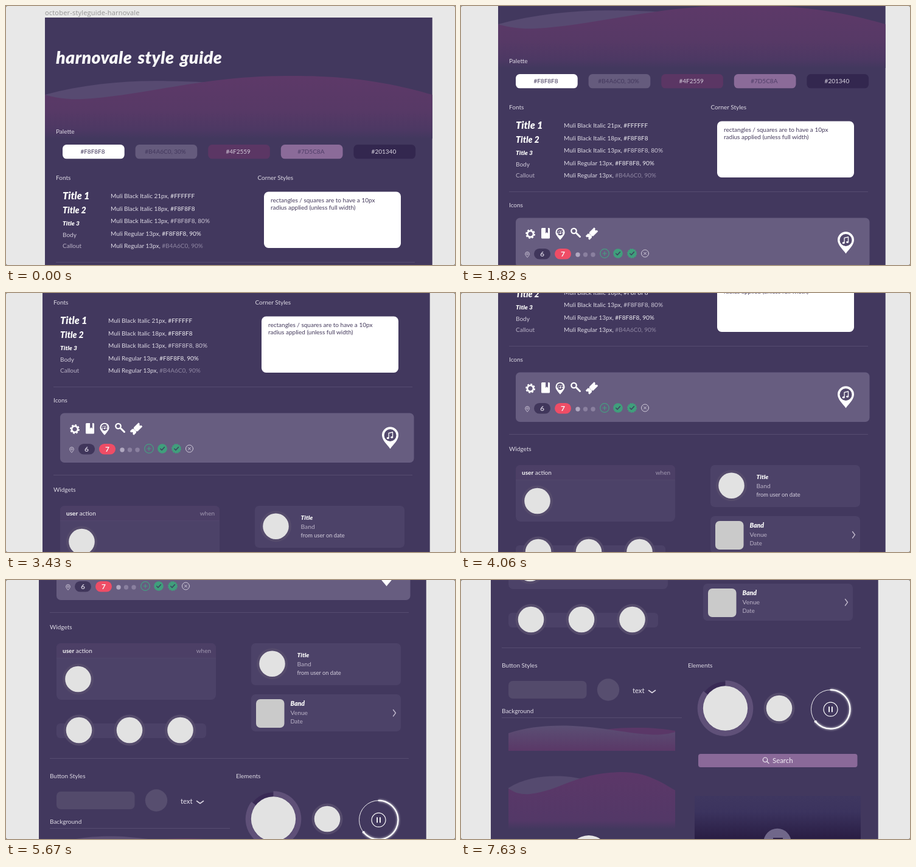
These frames come from a looping animation (738 px wide and 426 px high, 7700 ms). An HTML page:

```html
<!DOCTYPE html>
<html lang="en">
<head>
<meta charset="utf-8">
<title>Style guide</title>
<style>
  html, body { margin: 0; width: 100%; height: 100%; overflow: hidden; background: #777; }
  #stage { display: block; width: 738px; height: 426px; background: #e8e8e8; border-radius: 3px; }
  text { font: 10px Lato, "Open Sans", sans-serif; fill: #dedae5; }
  .label { font: 11px "Open Sans", sans-serif; letter-spacing: .2px; fill: #929292; }
  .black { font-weight: 900; font-style: italic; fill: #f8f8f8; }
  .headline { font-size: 28.5px; letter-spacing: .4px; word-spacing: 3px; }
  .bold { font-weight: 700; fill: #f8f8f8; }
  .bright { fill: #f0eef3; }
  .soft { fill: #b9b1c6; }
  .dim { fill: #9087a3; }
  .ink { fill: #443a5c; }
  .mid { text-anchor: middle; }
  .end { text-anchor: end; }
  .rule { stroke: #564c70; }
  .card { fill: #4c4268; }
  .line { fill: none; stroke-linecap: round; stroke-linejoin: round; }
  .white { fill: #fff; }
</style>
</head>
<body>
<svg id="stage" viewBox="0 0 738 426">
  <defs>
    <linearGradient id="fade" x1="0" y1="0" x2="0" y2="1">
      <stop offset="0" stop-color="#5d3968"/>
      <stop offset=".55" stop-color="#573966"/>
      <stop offset=".87" stop-color="#4c3863"/>
      <stop offset="1" stop-color="#42385e"/>
    </linearGradient>
    <linearGradient id="block" x1="0" y1="0" x2="0" y2="1">
      <stop offset="0" stop-color="#5c3768"/>
      <stop offset=".85" stop-color="#533867"/>
      <stop offset="1" stop-color="#42385e"/>
    </linearGradient>
    <linearGradient id="mist" x1="0" y1="0" x2="0" y2="1">
      <stop offset="0" stop-color="#5b4f74"/>
      <stop offset="1" stop-color="#5a3867"/>
    </linearGradient>
    <linearGradient id="night" x1="0" y1="0" x2="0" y2="1">
      <stop offset="0" stop-color="#3f3760"/>
      <stop offset=".35" stop-color="#3b335e"/>
      <stop offset="1" stop-color="#271a40"/>
    </linearGradient>
    <filter id="glow" x="-20%" y="-20%" width="140%" height="140%">
      <feGaussianBlur stdDeviation="1.6"/>
    </filter>
    <g id="avatar">
      <circle r="25.5" fill="#554b6c"/>
      <circle r="21.3" fill="#e2e2e2"/>
    </g>
    <path id="pin" d="M0 22C-5 15-13.500 8-13.500-.5a13.500 13.500 0 0 1 27 0C13.500 8 5 15 0 22z"/>
    <g id="note">
      <path class="line" d="M-2.400 4V-4.200L4-5.500V2.600" stroke="#fff" stroke-width="1.300"/>
      <ellipse cx="-3.800" cy="4.200" rx="2" ry="1.600" class="white"/>
      <ellipse cx="2.600" cy="2.800" rx="2" ry="1.600" class="white"/>
    </g>
    <path id="tick" class="line" d="M-3.200 .2L-1 2.400L3.400-2.400" stroke="#3d4a61" stroke-width="1.600"/>
  </defs>

  <g id="page">
    <text class="label" x="64" y="15">october-styleguide-harnovale</text>
    <rect x="64" y="19" width="636.700" height="1300" fill="#42385e"/>

    <!-- header -->
    <path d="M64 146C130 128 200 122 265 123.500C310 124 350 126 390 132L240 160H64z" fill="#574a71"/>
    <path d="M64 146C85 152 105 154 125 153C230 147 330 114 465 115C575 114 645 130 700.700 146V218H64z" fill="url(#fade)"/>
    <text class="black headline" x="82" y="94.500">harnovale style guide</text>

    <!-- palette -->
    <text x="82" y="210.300">Palette</text>
    <g id="swatches"></g>

    <!-- fonts -->
    <text x="82" y="286.300">Fonts</text>
    <text class="black" x="93" y="318" style="font-size:16.300px">Title 1</text>
    <text class="black" x="93" y="341.300" style="font-size:14.200px">Title 2</text>
    <text class="black" x="93" y="360.800" style="font-size:10.200px">Title 3</text>
    <text x="93" y="380.300" style="fill:#d0cad9">Body</text>
    <text class="soft" x="93" y="398">Callout</text>
    <text x="172" y="316.300">Muli Black Italic 21px, <tspan class="bright">#FFFFFF</tspan></text>
    <text x="172" y="336.800">Muli Black Italic 18px, <tspan class="bright">#F8F8F8</tspan></text>
    <text x="172" y="357.300">Muli Black Italic 13px, <tspan style="fill:#cfc9d8">#F8F8F8, 80%</tspan></text>
    <text x="172" y="377.800">Muli Regular 13px, <tspan class="bright">#F8F8F8, 90%</tspan></text>
    <text x="172" y="398.300">Muli Regular 13px, <tspan class="dim">#B4A6C0, 90%</tspan></text>

    <text x="413.500" y="286.300">Corner Styles</text>
    <rect class="white" x="424" y="305.500" width="225" height="92.500" rx="7.500"/>
    <text class="ink" x="435" y="323.300">rectangles / squares are to have a 10px</text>
    <text class="ink" x="435" y="334.800">radius applied (unless full width)</text>
    <path class="rule" d="M82 421.500H672"/>

    <!-- icons -->
    <text x="82" y="447">Icons</text>
    <rect x="93" y="464.500" width="581.500" height="81.500" rx="7" fill="#675d80"/>
    <g transform="translate(117 491)" fill="none" stroke="#fff">
      <circle r="5" stroke-width="2.600"/>
      <circle r="6.600" stroke-width="2.600" stroke-dasharray="2.900 2.284"/>
    </g>
    <path class="white" d="M136.500 481H142V490L144 488L146 490V481H147.500Q149 481 149 482.500V497Q149 498.500 147.500 498.500H136.500Q135 498.500 135 497V482.500Q135 481 136.500 481z"/>
    <use href="#pin" transform="translate(166 488.500) scale(.56)" fill="#fff"/>
    <circle cx="166" cy="488" r="5.400" fill="#5b5074"/>
    <use href="#note" transform="translate(164 488.500) scale(.52)"/>
    <use href="#note" transform="translate(168.500 488) scale(.52)"/>
    <g class="line" stroke="#fff">
      <circle cx="188.500" cy="486" r="4.200" stroke-width="2.300"/>
      <path d="M193 490L198.500 495.500" stroke-width="3"/>
    </g>
    <g transform="translate(218 490.500) rotate(-45) scale(.95 .82)">
      <path class="white" d="M-10.500-5.500H-4.500A1.500 1.500 0 0 0-1.500-5.500H10.500V-2A2 2 0 0 0 10.500 2V5.500H-1.500A1.500 1.500 0 0 0-4.500 5.500H-10.500V2A2 2 0 0 0-10.500-2z"/>
      <path d="M-3-3V3.500" stroke="#675d80" stroke-width=".8" stroke-dasharray="1.500 1.200"/>
    </g>
    <use href="#pin" transform="translate(112 524) scale(.25)" fill="none" stroke="#c9c2d4" stroke-width="4"/>
    <circle cx="112" cy="524" r="1.400" fill="none" stroke="#c9c2d4" stroke-width=".8"/>
    <rect x="123" y="515" width="27" height="17.500" rx="8.750" fill="#40365b"/>
    <text class="mid" x="136.500" y="527.700" style="font-size:12px;font-weight:700;fill:#cbc5d6">6</text>
    <rect x="157" y="515" width="27" height="17.500" rx="8.750" fill="#ef4d66"/>
    <text class="mid bold" x="170.500" y="527.700" style="font-size:12px">7</text>
    <circle cx="195" cy="525" r="3.700" fill="#b0a8c0"/>
    <circle cx="207.500" cy="525" r="3.700" fill="#8a809f"/>
    <circle cx="220" cy="525" r="3.700" fill="#8a809f"/>
    <g class="line" stroke="#45a081">
      <circle cx="239" cy="523" r="7.300" stroke-width="1.200"/>
      <path d="M236 523H242M239 520V526" stroke-width="1.200"/>
    </g>
    <circle cx="261" cy="523" r="7.800" fill="#409f7c"/>
    <use href="#tick" x="261" y="523"/>
    <circle cx="284" cy="523" r="7.200" fill="#409f7c"/>
    <circle cx="284" cy="523" r="7.200" fill="none" stroke="#409f7c" stroke-width="1.600" stroke-dasharray="2.270 1.500"/>
    <use href="#tick" x="284" y="523"/>
    <g class="line" stroke="#d3cddc">
      <circle cx="305.500" cy="523" r="6"/>
      <path d="M303.500 521L307.500 525M307.500 521L303.500 525"/>
    </g>
    <use href="#pin" x="635.500" y="501.300" fill="#fff"/>
    <circle cx="635.500" cy="501" r="10" fill="#544a6e"/>
    <use href="#note" x="635.500" y="501.500"/>
    <path class="rule" d="M82 566.500H672"/>

    <!-- widgets -->
    <text x="82" y="593.500">Widgets</text>
    <rect class="card" x="93" y="617" width="262" height="93" rx="8"/>
    <path d="M93 641.500V625Q93 617 101 617H347Q355 617 355 625V641.500z" fill="#4c3f66"/>
    <path d="M93 641.500H355" stroke="#51466c"/>
    <text class="bright" x="103" y="632.500"><tspan class="bold">user</tspan> action</text>
    <text class="end" x="347" y="632.500" style="fill:#a198b1">when</text>
    <use href="#avatar" x="128.500" y="676"/>

    <rect x="93" y="749" width="246" height="24" rx="6" fill="#4b4167"/>
    <use href="#avatar" x="130" y="760"/>
    <use href="#avatar" x="213" y="760"/>
    <use href="#avatar" x="296.500" y="760"/>

    <rect class="card" x="413" y="617" width="246" height="69" rx="7"/>
    <use href="#avatar" x="447.500" y="650.700"/>
    <text class="black" x="488.500" y="640" style="font-size:10.200px">Title</text>
    <text class="soft" x="488.500" y="654.700" style="font-size:10.300px">Band</text>
    <text x="488.500" y="668.500" style="font-size:9.300px;fill:#d4cedd">from user on date</text>

    <rect class="card" x="413" y="701" width="246" height="61" rx="7"/>
    <rect x="421" y="709" width="46.500" height="47" rx="7" fill="#cacaca"/>
    <text class="black" x="477.500" y="720" style="font-size:10.500px">Band</text>
    <text class="soft" x="477.500" y="734.700" style="font-size:10.300px">Venue</text>
    <text class="soft" x="477.500" y="748.500" style="font-size:9.500px">Date</text>
    <path class="line" d="M646.500 726.500L650.500 731.700L646.500 737" stroke="#c0b8cc" stroke-width="1.400"/>
    <path class="rule" d="M82 806.500H672"/>

    <!-- buttons -->
    <text x="82" y="839">Button Styles</text>
    <rect x="93" y="861" width="128.500" height="29" rx="7" fill="#534a6b"/>
    <circle cx="257" cy="875.500" r="18.200" fill="#574e6f"/>
    <text x="297" y="881" style="font-size:11.200px;font-weight:500">text</text>
    <path class="line" d="M323.500 876.500L329 880.500L334.500 876.500" stroke="#d6d0de" stroke-width="1.600"/>

    <!-- backgrounds -->
    <text x="82" y="913.500">Background</text>
    <path class="rule" d="M82 921.500H378"/>
    <path d="M230 945C255 939 280 938 305 938C330 938 350 940 367 943V976H230z" fill="#5a3767"/>
    <path d="M93 947C120 938 150 934 188 934.500C245 936 290 948 330 949.500C345 950 357 948 367 945V976H93z" fill="url(#mist)"/>
    <path d="M93 1037C120 1020 155 1016 185 1018C200 1019 215 1022 230 1026L170 1052H93z" fill="#554a6f"/>
    <path d="M93 1038C105 1046 115 1048 128 1047C180 1041 205 1011 280 1011C320 1011 345 1028 367 1041V1105H93z" fill="url(#block)"/>
    <circle cx="225" cy="1148" r="33" fill="#e6e6e6"/>

    <!-- elements -->
    <text x="388" y="839">Elements</text>
    <path d="M449.500 866A40 40 0 0 0 418 881.300" fill="none" stroke="#392a55" stroke-width="7"/>
    <path d="M449.500 864.800A41.300 41.300 0 1 1 417 880.600" fill="none" stroke="#5f5078" stroke-width="9"/>
    <circle cx="449.500" cy="906" r="36.700" fill="#e2e2e2"/>
    <use href="#avatar" x="538" y="906"/>
    <g transform="translate(622.500 907.700)" fill="none" stroke="#fff">
      <path d="M0-32A32 32 0 1 1-24.900 20.100" stroke-width="4" opacity=".55" filter="url(#glow)"/>
      <circle r="32" stroke-width="1" opacity=".9"/>
      <path d="M0-32A32 32 0 1 1-24.900 20.100" stroke-width="2.200" stroke-linecap="round"/>
      <circle cx="-24.900" cy="20.100" r="2" fill="#fff" stroke="none"/>
      <circle r="11.500" stroke-width="1.200"/>
      <path d="M-2.400-4.500V4.500M2.400-4.500V4.500" stroke-width="1.800"/>
    </g>
    <rect x="405" y="981" width="261.500" height="22" rx="4" fill="#8a6999"/>
    <g class="line" stroke="#efeaf3" stroke-width="1.200">
      <circle cx="515" cy="990.700" r="3.700"/>
      <path d="M517.800 993.500L521 996.700"/>
    </g>
    <text x="527" y="995.700" style="font-size:11.400px;fill:#efeaf3">Search</text>
    <rect x="399" y="1050" width="273" height="76" fill="url(#night)"/>
    <circle cx="535" cy="1126.500" r="22.700" fill="#70678a"/>
    <rect x="528" y="1119" width="16" height="16" fill="#2c2046"/>
  </g>
</svg>

<script>
  const LOOP = 7700, STEP = 70;

  // [time, offset] waypoints of the hand-dragged canvas
  const driftX = [[0, 0], [350, 0], [800, -7], [1330, -1], [1820, -3], [2030, -5], [2500, -11],
    [2800, -9], [3750, -3], [4060, -3], [4500, -14.5], [5000, -19], [5390, -16], [5670, -10],
    [6440, -6], [7070, -10], [7380, -17], [7630, -15]];
  const scrollY = [[0, 0], [350, 0], [1820, -116], [2800, -203], [4060, -334], [5670, -513],
    [6440, -584], [7630, -695]];

  const slope = (a, b) => (b[1] - a[1]) / (b[0] - a[0]);

  function tangent(keys, i) {
    if (i === 0) return slope(keys[0], keys[1]);
    if (i === keys.length - 1) return slope(keys[i - 1], keys[i]);
    const a = slope(keys[i - 1], keys[i]), b = slope(keys[i], keys[i + 1]);
    return a * b <= 0 ? 0 : 2 * a * b / (a + b);
  }

  // Monotone cubic interpolation
  function valueAt(keys, t) {
    const n = keys.findIndex(k => k[0] > t);
    if (n < 0) return keys[keys.length - 1][1];
    const [t0, v0] = keys[n - 1], [t1, v1] = keys[n];
    const d = t1 - t0, s = (t - t0) / d, r = 1 - s;
    return v0 * (1 + 2 * s) * r * r + v1 * s * s * (3 - 2 * s)
      + d * s * r * (tangent(keys, n - 1) * r - tangent(keys, n) * s);
  }

  const swatches = [
    ["#F8F8F8", "#ffffff", "#40365a"],
    ["#B4A6C0, 30%", "#655b7d", "#43385d"],
    ["#4F2559", "#5b3664", "#d5cddb"],
    ["#7D5C8A", "#8b6b99", "#503e68"],
    ["#201340", "#33274f", "#dcd7e3"]
  ];
  document.getElementById("swatches").innerHTML = swatches.map(([name, fill, ink], i) => {
    const x = 93 + i * 119.6;
    return `<rect x="${x}" y="228" width="101.7" height="23.3" rx="6.5" fill="${fill}"/>
      <text class="mid" x="${x + 49.5}" y="243.3" style="fill:${ink}">${name}</text>`;
  }).join("");

  const page = document.getElementById("page");
  const start = performance.now();

  function draw() {
    const t = Math.floor((performance.now() - start) % LOOP / STEP) * STEP;
    const x = Math.round(valueAt(driftX, t)), y = Math.round(valueAt(scrollY, t));
    page.setAttribute("transform", `translate(${x} ${y})`);
    requestAnimationFrame(draw);
  }
  draw();
</script>
</body>
</html>
```
